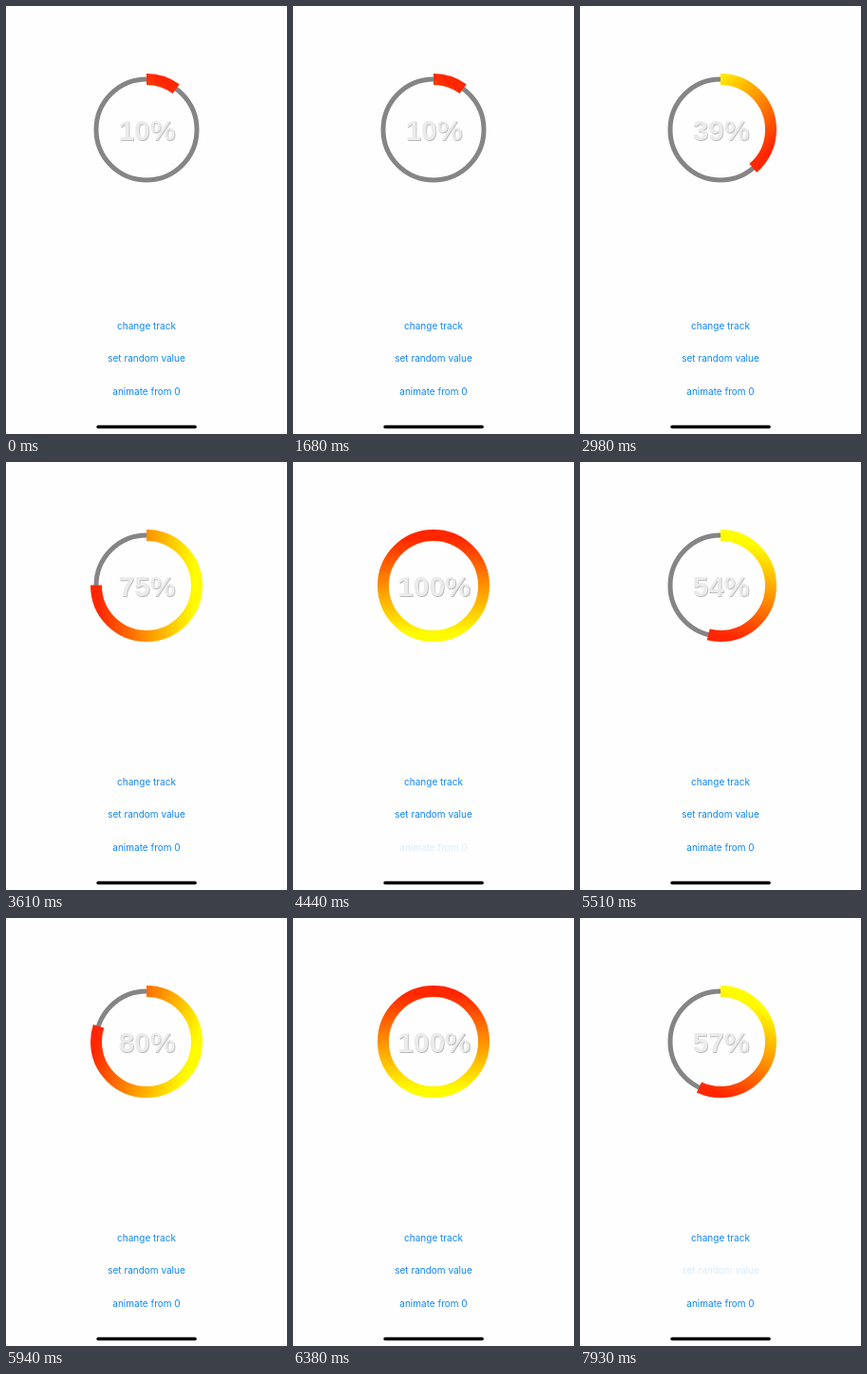
Recreate the animation shown at these times as an HTML page. Size 296x450 px, loop 8 s.

```html
<!DOCTYPE html>
<html lang="en">
<head>
<meta charset="utf-8">
<title>Circular progress</title>
<style>
  html, body { margin: 0; width: 100%; height: 100%; overflow: hidden; background: #fefefe; }
  svg { display: block; width: 100vw; height: 100vh; }
  text { text-anchor: middle; }
  .label { font: bold 30px "Liberation Sans", Arial, sans-serif; }
  .button { font: 10px Inter, Roboto, sans-serif; fill: #0f86f5; }
</style>
</head>
<body>
<svg viewBox="0 0 296 450">
  <defs>
    <linearGradient id="heat" gradientUnits="userSpaceOnUse">
      <stop offset="0" stop-color="#fffb00"/>
      <stop offset="1" stop-color="#ff2600"/>
    </linearGradient>
  </defs>
  <g transform="translate(148 130)" fill="none">
    <circle r="53" stroke="#858585" stroke-width="5"/>
    <circle id="arc" r="53" stroke="url(#heat)" stroke-width="12" pathLength="100" transform="rotate(-90)"/>
  </g>
  <text class="label" x="149.2" y="141.8" fill="#bcbcbc"></text>
  <text class="label" x="148.4" y="141" fill="#ebebeb"></text>
  <text class="button" x="148" y="339.7">change track</text>
  <text class="button" x="148" y="374.3" id="random">set random value</text>
  <text class="button" x="148" y="408.9" id="animate">animate from 0</text>
  <rect x="95.3" y="440.7" width="105.6" height="3.6" rx="1.8"/>
</svg>
<script>
const LOOP = 8000;
const DIM = 0.15;

// Tracks of [time in ms, value]; equal times make a hard change.
const progress = [
  [0, 10], [2250, 10], [2250, 0], [2980, 38.8], [4040, 100],
  [4670, 100], [4670, 2], [5510, 53.9], [6270, 100],
  [7250, 100], [7900, 57]
];
const animateAlpha = [
  [0, 1], [1840, 1], [1840, DIM], [2250, DIM], [2450, 1],
  [4210, 1], [4420, DIM], [4670, DIM], [4870, 1]
];
const randomAlpha = [
  [0, 1], [6720, 1], [6920, DIM], [7180, DIM], [7400, 1],
  [7720, 1], [7920, DIM]
];

const $ = id => document.getElementById(id);
const labels = document.querySelectorAll(".label");

function sample(track, t) {
  const next = track.findIndex(key => key[0] > t);
  if (next < 0) return track[track.length - 1][1];
  const [t0, v0] = track[next - 1];
  const [t1, v1] = track[next];
  return v0 + (v1 - v0) * (t - t0) / (t1 - t0);
}

function draw(t) {
  const value = sample(progress, t);
  $("arc").setAttribute("stroke-dasharray", value >= 100 ? "none" : `${value} 200`);

  // The gradient runs along the diameter that ends at the arc's tip.
  const angle = value / 100 * 2 * Math.PI;
  const x = 50 * Math.cos(angle), y = 50 * Math.sin(angle);
  const ends = { x1: -x, y1: -y, x2: x, y2: y };
  for (const name in ends) $("heat").setAttribute(name, ends[name]);

  for (const label of labels) label.textContent = Math.round(value) + "%";
  $("animate").style.opacity = sample(animateAlpha, t);
  $("random").style.opacity = sample(randomAlpha, t);
}

let start;
function tick(now) {
  start ??= now;
  draw((now - start) % LOOP);
  requestAnimationFrame(tick);
}
draw(0);
requestAnimationFrame(tick);
</script>
</body>
</html>
```
